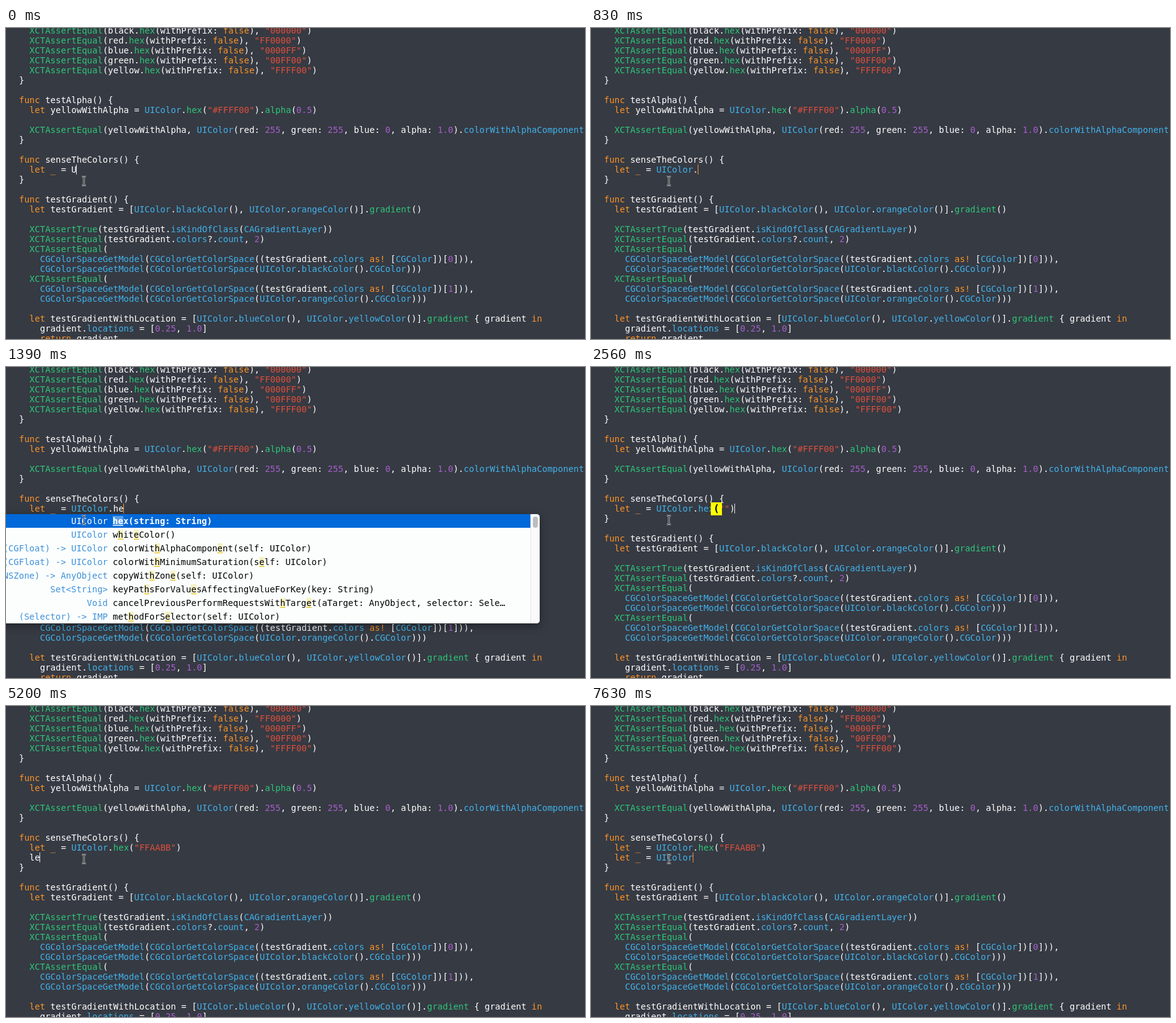
These frames come from a looping animation (933 px wide and 501 px high, 8 s). An HTML page:

```html
<!DOCTYPE html>
<html>
<head>
<meta charset="utf-8">
<style>
html, body { margin: 0; width: 100%; height: 100%; overflow: hidden; background: #363a43; }
body { position: relative; font: 14px/16px "DejaVu Sans Mono", monospace; color: #fff; }
body > * { position: absolute; }
pre { left: 21px; top: -4px; margin: 0; font: inherit; }
.key { color: #fd9426; }
.str { color: #dc4f3c; }
.num { color: #a75fcb; }
.own { color: #2cc678; }
.sys { color: #41b2ea; }
.token { display: inline-block; padding: 0 8px; border-radius: 8px; background: #3f7fd0; }
#caret { width: 1px; height: 16px; }
#flash { left: 193px; top: 218px; width: 18px; height: 21px; background: #ff0; color: #000; font: bold 16px/20px "DejaVu Sans Mono", monospace; text-align: center; }
#swatch { left: 207px; top: 140px; width: 56px; height: 36px; border: 2px solid #d6d0d0; background: #ffa9bd; }
.popup { left: -20px; overflow: hidden; border-radius: 5px; background: #fbfefd; color: #000; box-shadow: 0 4px 14px rgba(0,0,0,.4); white-space: pre; }
.row { position: relative; height: 22px; line-height: 22px; overflow: hidden; }
.row * { position: absolute; }
.type { color: #4091da; }
.row u { position: static; text-decoration-color: #e5b900; text-underline-offset: 2px; background: #f6f2c4; }
.row:first-child { background: #0068d9; color: #fff; font-weight: bold; }
.row:first-child .type { color: #fff; font-weight: normal; }
.row:first-child u { background: rgba(255,255,255,.35); text-decoration-color: #fff; }
.bar { position: absolute; right: 0; top: 0; width: 14px; height: 176px; background: #fafafa; border-left: 1px solid #e6e6e6; }
.bar::after { content: ""; position: absolute; left: 3px; top: 4px; width: 8px; height: 18px; border-radius: 4px; background: #bdbdbd; }
.doc { height: 65px; border-top: 1px solid #c4c4c4; background: #fdfdfd; font: 13.5px/18px Inter, sans-serif; padding: 5px 0 0 20px; box-sizing: border-box; }
.doc u { color: #0a2be0; }
</style>
</head>
<body>
<pre id="code"></pre>
<div id="caret"></div>
<div id="flash">(</div>
<div id="swatch"></div>
<svg id="mouse" style="left:118px;top:236px" width="16" height="21" fill="none">
  <g id="beam"><path id="ibeam" d="M4.5 3.5Q7.5 3.5 7.5 6V15Q7.5 17.5 4.5 17.5M10.5 3.5Q7.5 3.5 7.5 6M7.5 15Q7.5 17.5 10.5 17.5" stroke="#e4e4e4" stroke-width="2.4"/></g>
  <use href="#ibeam" style="display:none"/>
  <path d="M4.5 3.5Q7.5 3.5 7.5 6V15Q7.5 17.5 4.5 17.5M10.5 3.5Q7.5 3.5 7.5 6M7.5 15Q7.5 17.5 10.5 17.5" stroke="#111"/>
</svg>
<script>
const CH = 8.4287, LEFT = 21, LOOP = 8000;
const $ = id => document.getElementById(id);
const esc = s => s.replace(/&/g, '&amp;').replace(/</g, '&lt;');

const HEAD = `  XCTAssertEqual(black.hex(withPrefix: false), "000000")
  XCTAssertEqual(red.hex(withPrefix: false), "FF0000")
  XCTAssertEqual(blue.hex(withPrefix: false), "0000FF")
  XCTAssertEqual(green.hex(withPrefix: false), "00FF00")
  XCTAssertEqual(yellow.hex(withPrefix: false), "FFFF00")
}

func testAlpha() {
  let yellowWithAlpha = UIColor.hex("#FFFF00").alpha(0.5)

  XCTAssertEqual(yellowWithAlpha, UIColor(red: 255, green: 255, blue: 0, alpha: 1.0).colorWithAlphaComponent
}

func senseTheColors() {
`;
const TAIL = `
}

func testGradient() {
  let testGradient = [UIColor.blackColor(), UIColor.orangeColor()].gradient()

  XCTAssertTrue(testGradient.isKindOfClass(CAGradientLayer))
  XCTAssertEqual(testGradient.colors?.count, 2)
  XCTAssertEqual(
    CGColorSpaceGetModel(CGColorGetColorSpace((testGradient.colors as! [CGColor])[0])),
    CGColorSpaceGetModel(CGColorGetColorSpace(UIColor.blackColor().CGColor)))
  XCTAssertEqual(
    CGColorSpaceGetModel(CGColorGetColorSpace((testGradient.colors as! [CGColor])[1])),
    CGColorSpaceGetModel(CGColorGetColorSpace(UIColor.orangeColor().CGColor)))

  let testGradientWithLocation = [UIColor.blueColor(), UIColor.yellowColor()].gradient { gradient in
    gradient.locations = [0.25, 1.0]
    return gradient`;

const SYNTAX = /(?<str>"[^"\n]*"?)|‹(?<token>\w+)›|(?<key>\b(?:let|func|in|return|false|_)\b|\bas!)|(?<own>\bXCTAssert\w+|(?<=\.)(?:hex|alpha|gradient)\b)|(?<sys>\b(?:CG|CA|UIColor)\w*|(?<=\.)[a-z]\w{2,})|(?<num>\b\d[\d.]*)/g;

// level 0: keywords and strings, 1: all names as system names, 2: full colouring
function paint(text, level = 2) {
  return text.replace(SYNTAX, (...args) => {
    let [kind, part] = Object.entries(args.at(-1)).find(e => e[1] !== undefined);
    if (kind === 'own' && level === 1) kind = 'sys';
    if (level === 0 && (kind === 'own' || kind === 'sys')) return part;
    return `<span class="${kind}">${part}</span>`;
  });
}

// [time, text before the caret, text after it, level]
const LET = '  let _ = ', HEX = LET + 'UIColor.hex(';
const FIRST = [
  [0, LET + 'U'], [120, LET + 'UI'], [200, LET + 'UIC'], [620, LET + 'UIColor'],
  [830, LET + 'UIColor.'], [1060, LET + 'UIColor.h'], [1300, LET + 'UIColor.he'],
  [1620, HEX + '‹String›)', '', 1], [2100, HEX + '"', ')', 0], [2260, HEX + '""', ')', 1],
  [2560, HEX + '"")', '', 1], [2730, HEX + '""', ')', 1], [2910, HEX + '"', '")', 1],
  [3140, HEX + '"F', '")', 0], [3310, HEX + '"FF', '")', 0],
  [3600, HEX + '"FFA', '")', 0], [3840, HEX + '"FFAA', '")', 0],
  [4010, HEX + '"FFAAB', '")', 0], [4130, HEX + '"FFAABB', '")', 0],
  [4490, HEX + '"FFAABB"', ')', 0], [4670, HEX + '"FFAABB")', '', 0]
];
const SECOND = [
  [4940, '  '], [5080, '  l'], [5200, '  le'], [5380, '  let '], [5970, '  let _'],
  [6260, '  let _ '], [6440, '  let _ ='], [6610, LET], [6910, LET + 'U'],
  [7150, LET + 'UI'], [7270, LET + 'UIC'], [7570, LET + 'UIColor']
];

function mark(name, typed) {
  let i = 0;
  return [...name].map(c => {
    const hit = i < typed.length && c.toLowerCase() === typed[i].toLowerCase();
    if (hit) i++;
    return hit ? `<u>${c}</u>` : esc(c);
  }).join('');
}

function popup(x, right, typed, rows, doc = '') {
  const el = document.createElement('div');
  el.className = 'popup';
  el.style.width = right + 20 + 'px';
  el.innerHTML = rows.map(([name, type = name]) =>
    `<div class="row"><span class="type" style="right:${right - x + 8}px">${esc(type)}</span>` +
    `<span style="left:${x + 20}px">${mark(name, typed)}</span></div>`).join('') +
    '<div class="bar"></div>' + doc;
  document.body.insertBefore(el, $('mouse'));
  return el;
}

const U = 'UIColor', F = '(CGFloat) -> UIColor', Z = '(NSZone) -> AnyObject';
const classes = popup(105, 358, 'UIC',
  ['Color', 'Control', 'ColorTests', 'ControlState', 'ControlEvents', 'CollectionView', 'CoordinateSpace', 'ContentContainer'].map(s => ['UI' + s]),
  `<div class="doc">ents color and sometimes opacity (alpha value). You
s to store color data, and during drawing you can use
 fill and stroke colors.  <u>More...</u></div>`);
const members = popup(172, 560, '', [
  ['alpha(self: UIColor)', F], ['blackColor()', U], ['blueColor()', U], ['brownColor()', U], ['clearColor()', U],
  ['colorWithAlphaComponent(self: UIColor)', F], ['colorWithMinimumSaturation(self: UIColor)', F], ['copyWithZone(self: UIColor)', Z]
]);
const matches = [
  ['hex(string: String)', U], ['hash(self: UIColor)', 'Int'], ['whiteColor()', U],
  ['colorWithAlphaComponent(self: UIColor)', F], ['colorWithMinimumSaturation(self: UIColor)', F],
  ['copyWithZone(self: UIColor)', Z], ['keyPathsForValuesAffectingValueForKey(key: String)', 'Set<String>'],
  ['cancelPreviousPerformRequestsWithTarget(aTarget: AnyObject, selector: Sele…', 'Void']
];
const filteredH = popup(172, 860, 'h', matches);
const filteredHe = popup(172, 860, 'he', matches.filter((m, i) => i !== 1).concat([['methodForSelector(self: UIColor)', '(Selector) -> IMP']]));

// [element, start, end, top, length of the fade]
const SHOWS = [
  [classes, 320, 680, 237, 60], [members, 890, 1120, 237, 0], [filteredH, 1120, 1390, 237, 0],
  [filteredHe, 1390, 1680, 237, 60], [classes, 7330, 7630, 253, 60]
];

const show = (el, on) => el.style.visibility = on ? 'visible' : 'hidden';
let current;

function edit(t) {
  const second = t >= 4940;
  const step = (second ? SECOND : FIRST).findLast(s => t >= s[0]);
  if (step === current) return;
  current = step;
  const [, before, after = '', level = 2] = step;
  const done = second ? paint(HEX + '"FFAABB")') + '\n' : '';
  $('code').innerHTML = paint(HEAD) + done + paint(before + after, level) + paint(TAIL);
  // the token's rounded ends replace its two marker characters
  const extra = before.includes('‹') ? 16 - 2 * CH : 0;
  $('caret').style.left = Math.floor(LEFT + before.length * CH + extra) + 'px';
  $('caret').style.top = (second ? 236 : 220) + 'px';
}

function draw(now) {
  const t = now % LOOP;
  edit(t);
  const completing = t >= 200 && t < 1620 || t >= 7270;
  $('caret').style.background = completing ? '#fd9426' : '#e8e8e8';
  show($('caret'), t < 1620 || t >= 2100);
  show($('swatch'), t >= 4130 && t < 4490);

  const age = t - (t < 4000 ? 2560 : 4670);
  show($('flash'), age >= 0 && age < 170);
  $('flash').style.transform = age >= 60 && age < 120 ? 'scale(1.2)' : '';

  for (const [el] of SHOWS) show(el, false);
  for (const [el, from, to, top, fade] of SHOWS) {
    if (t < from || t >= to) continue;
    show(el, true);
    el.style.top = top + 'px';
    el.style.opacity = t >= to - fade ? 0.5 : 1;
  }
  requestAnimationFrame(() => draw(performance.now()));
}
draw(performance.now());
</script>
</body>
</html>
```
